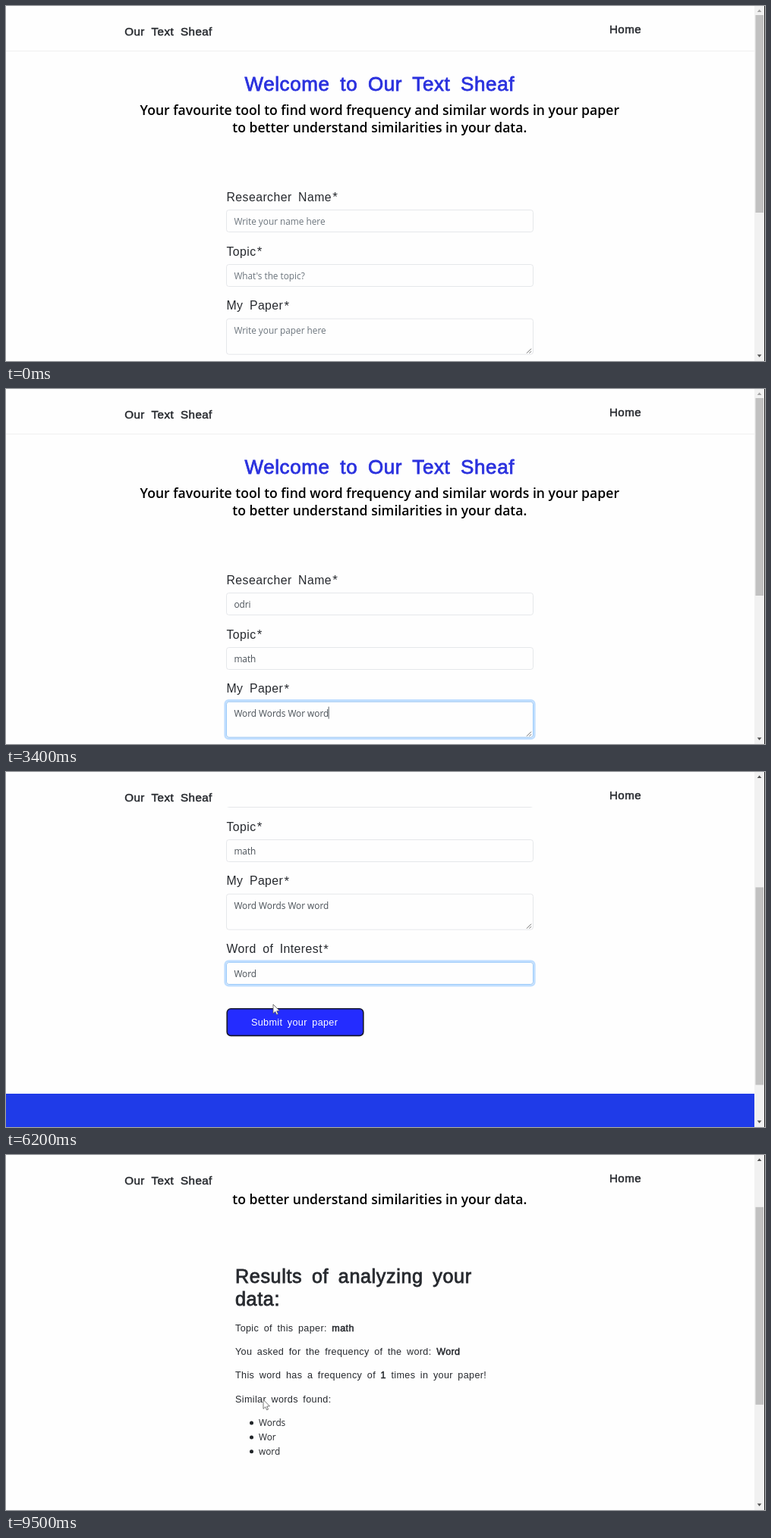
An HTML page that plays this animation: 1000x469 px, repeating every 9900 ms.

```html
<!DOCTYPE html>
<html lang="en">
<head>
<meta charset="utf-8">
<title>Word frequency form</title>
<style>
  html, body { margin: 0; width: 100%; height: 100%; overflow: hidden; background: #fefefe; }
  svg { display: block; width: 100%; height: 100%; }
  text { font-family: "Liberation Sans", Arial, sans-serif; fill: #26292e; }
  .brand { font-size: 15.2px; letter-spacing: .4px; word-spacing: 4.4px; stroke: #26292e; stroke-width: .5px; }
  .head { font-size: 25.2px; letter-spacing: .6px; word-spacing: 5.1px; stroke: #26292e; stroke-width: .8px; }
  .title { font-size: 26px; word-spacing: 5.9px; fill: #2a31de; stroke: #2a31de; }
  .sub { font: 600 17.6px "Open Sans", "Noto Sans", sans-serif; fill: #000; }
  .mid { text-anchor: middle; }
  .label { font-size: 15.8px; letter-spacing: .45px; word-spacing: 3.6px; }
  .star { font-size: 17px; }
  .body { font-size: 12.6px; letter-spacing: .35px; word-spacing: 2.7px; }
  .body tspan { stroke: #26292e; stroke-width: .5px; }
  .ui { font: 11.8px "Open Sans", "Noto Sans", sans-serif; }
  .send { fill: #fff; }
  .box { fill: #fefefe; stroke: #e5e7ea; }
  .ring rect { fill: none; }
  .grip { stroke: #5c5c5c; stroke-width: .9; fill: none; }
  .cursor { fill: #fff; stroke: #555; stroke-width: .8; stroke-linejoin: round; }
</style>
</head>
<body>
<svg viewBox="0 0 1000 469" preserveAspectRatio="none">
  <rect width="1000" height="469" fill="#fefefe"/>
  <g id="page">
    <path d="M0 59.5H986" stroke="#f0f0f0"/>
    <text class="head title mid" x="492.3" y="112.3">Welcome to Our Text Sheaf</text>
    <text class="sub mid" x="492.3" y="144">Your favourite tool to find word frequency and similar words in your paper</text>
    <text class="sub mid" x="492.3" y="166.5">to better understand similarities in your data.</text>

    <g id="form">
      <g id="fields"></g>
      <rect x="291.2" y="564.8" width="179.6" height="35.6" rx="5" fill="#242cff" stroke="#15172b" stroke-width="1.6"/>
      <text class="body send" x="323" y="587.2">Submit your paper</text>
    </g>

    <g id="results">
      <text class="head" x="302" y="270.5">Results of analyzing your</text>
      <text class="head" x="302" y="300.5">data:</text>
      <text class="body" x="302" y="335">Topic of this paper: <tspan>math</tspan></text>
      <text class="body" x="302" y="366.2">You asked for the frequency of the word: <tspan>Word</tspan></text>
      <text class="body" x="302" y="397.4">This word has a frequency of <tspan>1</tspan> times in your paper!</text>
      <text class="body" x="302" y="428.6">Similar words found:</text>
      <g id="list"></g>
    </g>
    <rect y="677" width="987" height="140" fill="#1f3be8"/>
  </g>

  <rect width="986" height="46" fill="#fefefe"/>
  <text class="brand" x="156.3" y="39.2">Our Text Sheaf</text>
  <text class="brand" x="795" y="36">Home</text>

  <rect x="986" width="14" height="469" fill="#f1f1f1"/>
  <rect id="thumb" x="987.5" y="12" width="10.5" height="261" fill="#c1c1c1"/>
  <path id="up" d="M989.8 8L992.6 4.6L995.4 8Z"/>
  <path d="M989.8 460.6L992.6 464L995.4 460.6Z" fill="#505050"/>
  <rect x="999" width="1" height="469" fill="#222"/>

  <path id="arrow" class="cursor" d="M0 0V12L2.8 9.5L4.6 13.5L6.5 12.7L4.7 8.8L8.4 8.5Z"/>
  <path id="hand" class="cursor" d="M-1.4 1.2Q-1.4 0 -.2 0Q1 0 1 1.2V6Q2 5 3.2 6.2Q4.3 5.4 5.2 6.7Q6.9 6.2 7 8V11Q7 13 5.6 15.6H-.2Q-1.4 13.4 -3.6 10.8Q-5.4 8.6 -4 8Q-2.8 7.6 -1.4 9.4Z"/>
</svg>
<script>
const LOOP = 9900, STEP = 100, FADE = 150;
const NS = "http://www.w3.org/2000/svg";
const $ = id => document.getElementById(id);

function add(parent, tag, attrs, text) {
  const el = document.createElementNS(NS, tag);
  for (const k in attrs) el.setAttribute(k, attrs[k]);
  if (text) el.textContent = text;
  parent.append(el);
  return el;
}

// focus: [gained, lost]; keys: [time, text typed so far]
const fields = [
  { label: "Researcher Name", base: 257.5, y: 269, h: 30, hint: "Write your name here", focus: [200, 1500],
    keys: [[900, "o"], [1000, "od"], [1200, "odr"], [1300, "odri"]] },
  { label: "Topic", base: 329.5, y: 341, h: 30, hint: "What's the topic?", focus: [1500, 2800],
    keys: [[1800, "m"], [1900, "ma"], [2300, "mat"], [2400, "math"]] },
  { label: "My Paper", base: 401, y: 412.7, h: 48, hint: "Write your paper here", focus: [2800, 4400],
    keys: [[2900, "Word"], [3300, "Word Words Wor"], [3400, "Word Words Wor word"]] },
  { label: "Word of Interest", base: 491, y: 503, h: 30, hint: "Choose a word to analyze its frequency and similarities!",
    focus: [4400, 6600], keys: [[5000, "W"], [5200, "Wo"], [5300, "Wor"], [5500, "Word"]] }
];
const scrollKeys = [[3700, 0], [3800, 70], [3900, 155], [4000, 224], [4100, 238], [4200, 246], [4400, 252],
  [8600, 252], [8700, 222], [8900, 150], [9000, 118], [9100, 102]];
const mouseX = [[6000, 388], [6100, 370], [6200, 352], [6300, 343], [6400, 339]];
const mouseY = [[6000, 268], [6100, 290], [6200, 307], [6300, 319], [6400, 323.3]];
const SHOW_MOUSE = 6000, RESULTS = 8000, WHEEL = 8700;

for (const f of fields) {
  const g = $("fields");
  const label = add(g, "text", { class: "label", x: 290.5, y: f.base }, f.label);
  add(label, "tspan", { class: "star", dx: 1.2, dy: .8 }, "*");
  const size = { x: 290.5, y: f.y + .5, width: 404, height: f.h - 1, rx: 3.2 };
  add(g, "rect", { class: "box", ...size });
  f.ring = add(g, "g", { class: "ring" });
  add(f.ring, "rect", { x: 288.7, y: f.y - 1.3, width: 407.6, height: f.h + 2.6, rx: 4.6,
    stroke: "#007bff", "stroke-opacity": .25, "stroke-width": 2.6 });
  add(f.ring, "rect", { ...size, stroke: "#a0cdfa" });
  if (f.h > 30) {
    const b = f.y + f.h - 2;
    add(g, "path", { class: "grip", d: `M686 ${b}l6-6M689.5 ${b}l2.5-2.5` });
  }
  f.text = add(g, "text", { class: "ui", x: 300.4, y: f.y + 19.9 });
  f.caret = add(g, "rect", { y: f.y + 7, width: .9, height: 16, fill: "#495057" });
}
["Words", "Wor", "word"].forEach((word, i) => {
  const y = 460.3 + i * 18.8;
  add($("list"), "circle", { cx: 323.5, cy: y - 4.2, r: 2.5, fill: "#212529" });
  add($("list"), "text", { class: "ui", x: 333, y }, word);
});

const clamp = v => Math.max(0, Math.min(1, v));
const show = (el, on) => el.setAttribute("visibility", on ? "visible" : "hidden");

function tween(keys, t) {
  const i = keys.findIndex(k => k[0] > t);
  if (i < 0) return keys[keys.length - 1][1];
  if (i === 0) return keys[0][1];
  const [t0, a] = keys[i - 1], [t1, b] = keys[i];
  return a + (b - a) * (t - t0) / (t1 - t0);
}

function drawField(f, t) {
  const [on, off] = f.focus;
  const typed = f.keys.filter(k => k[0] <= t).pop();
  f.text.textContent = typed ? typed[1] : f.hint;
  f.text.style.fill = typed ? "#495057" : "#6c757d";
  const glow = t < on ? 0 : clamp((t + STEP - on) / FADE);
  f.ring.setAttribute("opacity", glow * (1 - clamp((t - off) / FADE)));
  const since = t - (typed ? typed[0] : on);
  const lit = t >= on && t < off && Math.floor(since / 500) % 2 === 0;
  f.caret.setAttribute("x", 299.9 + (typed ? f.text.getComputedTextLength() : 0));
  f.caret.setAttribute("opacity", lit ? 1 : 0);
}

function draw(t) {
  const scroll = tween(scrollKeys, t);
  $("page").setAttribute("transform", `translate(0 ${-scroll})`);
  $("thumb").setAttribute("y", 12 + scroll * .557);
  $("up").setAttribute("fill", scroll ? "#505050" : "#a3a3a3");
  show($("form"), t < RESULTS);
  show($("results"), t >= RESULTS);
  fields.forEach(f => drawField(f, t));

  const x = tween(mouseX, t), y = tween(mouseY, t);
  const overButton = y > 312 && t < WHEEL;
  for (const id of ["arrow", "hand"]) {
    $(id).setAttribute("transform", `translate(${x} ${y})`);
    show($(id), t >= SHOW_MOUSE && overButton === (id === "hand"));
  }
}

let start;
function frame(now) {
  start ??= now;
  draw(Math.floor((now - start) % LOOP / STEP) * STEP);
  requestAnimationFrame(frame);
}
draw(0);
requestAnimationFrame(frame);
</script>
</body>
</html>
```
